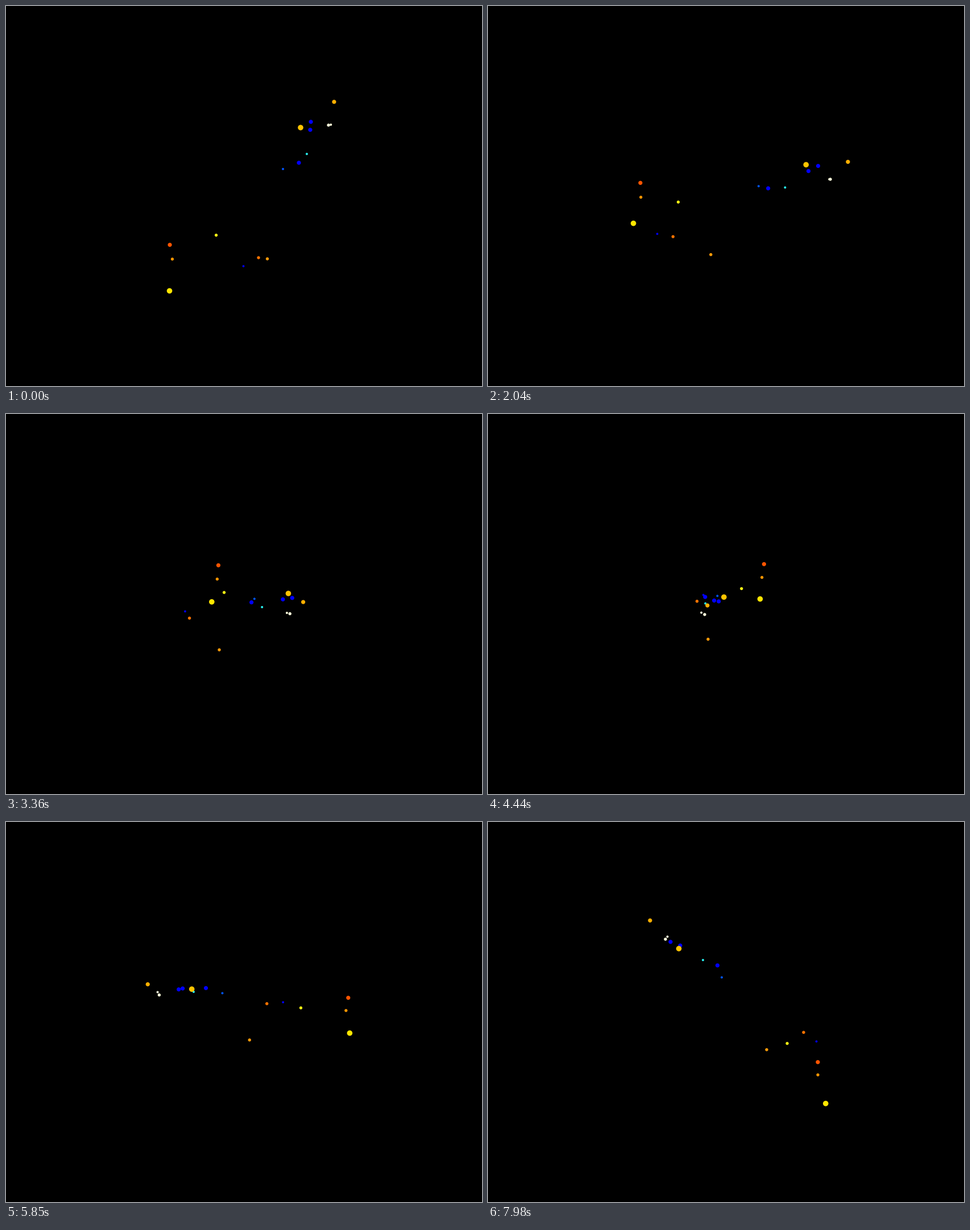
Write a matplotlib script that moves like this. It is 837x669 px and loops after 8000 ms.

```python
import numpy as np
import matplotlib.pyplot as plt
from matplotlib.animation import FuncAnimation

W, H, DPI = 837, 669, 64
FRAMES, LOOP_MS = 267, 8000
CX, CY = 435.92, 330.88        # screen position of the rotation centre
EYE = 2784.5                   # camera distance in pixels
ELEV = np.radians(30)

# x (towards the viewer), y (right), z (up), diameter in px, colour
STARS = [
    (-144.6, 144.6, 108.5, 7.2, "#ffb000"),
    (-95.7, 83.3, 81.7, 9.6, "#ffc400"),
    (-109.7, 102.0, 86.0, 7.2, "#0000ff"),
    (-92.6, 100.5, 78.8, 7.2, "#0000ff"),
    (-27.5, 79.1, 47.5, 7.2, "#0000ff"),
    (-118.0, 134.2, 75.0, 5.4, "#ffffdc"),
    (-114.2, 138.2, 77.9, 4.0, "#ffffdc"),
    (-52.6, 93.7, 51.5, 4.0, "#28f0f0"),
    (-21.6, 51.1, 38.2, 4.0, "#0055ff"),
    (84.7, -65.0, -33.2, 5.3, "#fffa14"),
    (129.1, -142.6, -25.2, 7.2, "#ff5500"),
    (130.3, -139.0, -53.1, 5.3, "#ff9600"),
    (144.6, -144.6, -108.5, 9.6, "#ffe600"),
    (121.7, 7.9, -55.7, 5.4, "#ff7300"),
    (57.3, 23.6, -98.8, 5.4, "#ff9b08"),
    (141.9, -17.8, -60.0, 3.9, "#0000f0"),
]

px, py, pz = np.array([s[:3] for s in STARS]).T
sizes = (np.array([s[3] for s in STARS]) * 72 / DPI) ** 2
colors = np.array([s[4] for s in STARS])


def project(azim):
    """Screen positions and depth of all stars, seen from an azimuth in degrees."""
    a = np.radians(azim)
    side = py * np.cos(a) - px * np.sin(a)
    front = px * np.cos(a) + py * np.sin(a)
    depth = front * np.cos(ELEV) + pz * np.sin(ELEV)
    rise = pz * np.cos(ELEV) - front * np.sin(ELEV)
    scale = 1 / (1 - depth / EYE)
    return np.column_stack([CX + side * scale, CY - rise * scale]), depth


fig = plt.figure(figsize=(W / DPI, H / DPI), dpi=DPI, facecolor="black")
ax = fig.add_axes([0, 0, 1, 1])
ax.set_xlim(0, W)
ax.set_ylim(H, 0)
ax.axis("off")
dots = ax.scatter(px, py, s=sizes, c=colors, linewidths=0)


def update(i):
    # one degree per frame, far stars painted first
    pos, depth = project(i)
    order = np.argsort(depth)
    dots.set_offsets(pos[order])
    dots.set_sizes(sizes[order], DPI)
    dots.set_facecolor(colors[order])
    return dots,


anim = FuncAnimation(fig, update, frames=FRAMES, interval=LOOP_MS / FRAMES,
                     init_func=lambda: update(0), repeat=True, repeat_delay=0)
plt.show()
```
